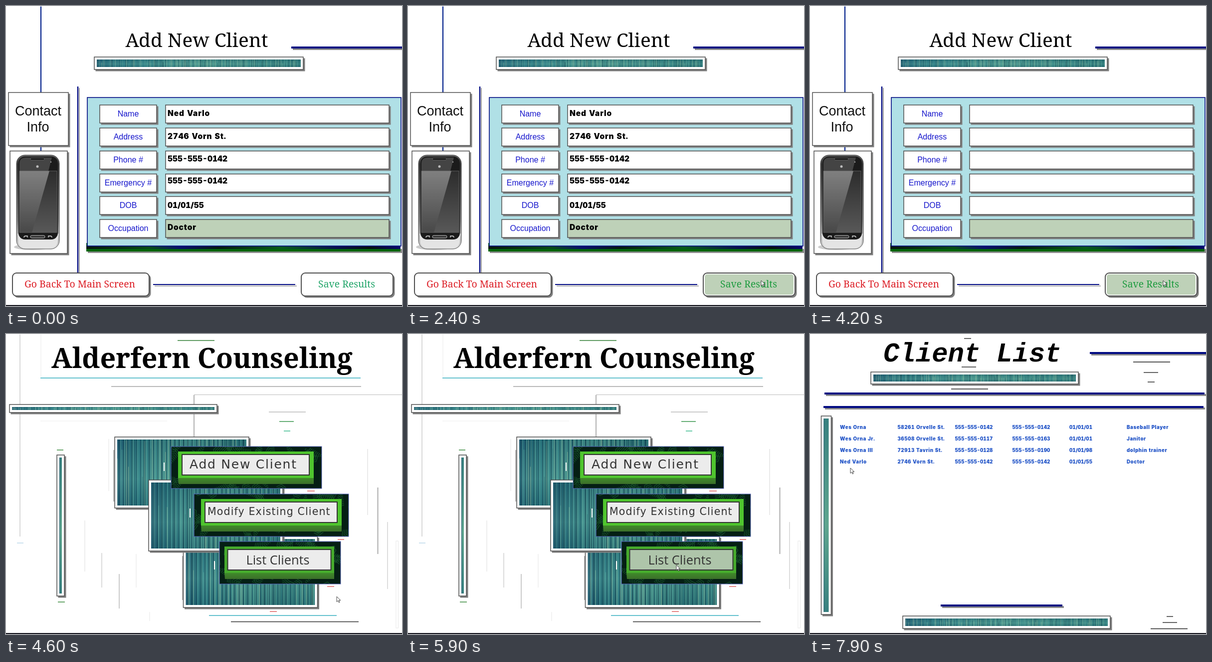
Write an HTML page that moves like this. It is 794 px wide and 600 px high and loops after 8 s.

```html
<!DOCTYPE html>
<html lang="en">
<head>
<meta charset="utf-8">
<title>Client manager</title>
<style>
  html, body { margin: 0; width: 100%; height: 100%; overflow: hidden; background: #fff; }
  svg { display: block; }
  .serif { font-family: "Noto Serif", "Liberation Serif", serif; }
  .sans { font-family: "Liberation Sans", Arial, sans-serif; }
  .human { font-family: "Open Sans", "Noto Sans", sans-serif; }
  .wide { font-family: "DejaVu Sans", Verdana, sans-serif; }
  .heavy { font-family: Inter, Roboto, sans-serif; font-weight: 900; font-variant-numeric: tabular-nums; }
  .mono { font-family: "Liberation Mono", monospace; font-weight: 700; font-style: italic; }
  .bold { font-weight: 700; }
  .mid { text-anchor: middle; }
  text { white-space: pre; }
</style>
</head>
<body>
<svg id="stage" width="794" height="600" viewBox="0 0 794 600">
  <defs>
    <linearGradient id="teal">
      <stop offset="0" stop-color="#235f78"/><stop offset=".12" stop-color="#2b7a86"/>
      <stop offset=".5" stop-color="#48978f"/><stop offset="1" stop-color="#2c7a7c"/>
    </linearGradient>
    <linearGradient id="tealDown" x2="0" y2="1">
      <stop offset="0" stop-color="#37807f"/><stop offset=".55" stop-color="#5fa68f"/>
      <stop offset="1" stop-color="#37807f"/>
    </linearGradient>
    <linearGradient id="shade" x2="0" y2="1">
      <stop offset="0" stop-color="#0c3a4a" stop-opacity=".22"/>
      <stop offset=".6" stop-color="#7cc0a8" stop-opacity=".18"/>
      <stop offset="1" stop-color="#0c3a4a" stop-opacity=".18"/>
    </linearGradient>
    <linearGradient id="band">
      <stop offset="0" stop-color="#06160c"/><stop offset=".2" stop-color="#0a4a18"/>
      <stop offset=".3" stop-color="#08106a"/><stop offset=".42" stop-color="#041a10"/>
      <stop offset=".62" stop-color="#0a5a1c"/><stop offset=".8" stop-color="#06104c"/>
      <stop offset=".9" stop-color="#04120c"/><stop offset="1" stop-color="#08086e"/>
    </linearGradient>
    <linearGradient id="rim" x2="0" y2="1">
      <stop offset="0" stop-color="#666"/><stop offset=".1" stop-color="#333"/>
      <stop offset=".7" stop-color="#777"/><stop offset="1" stop-color="#d8d8d8"/>
    </linearGradient>
    <linearGradient id="glass" x2="0" y2="1">
      <stop offset="0" stop-color="#2c2c2c"/><stop offset="1" stop-color="#585858"/>
    </linearGradient>
    <linearGradient id="glare" x2="0" y2="1">
      <stop offset="0" stop-color="#808080"/><stop offset="1" stop-color="#484848"/>
    </linearGradient>
    <linearGradient id="bevel" x2="0" y2="1">
      <stop offset="0" stop-color="#3f8a2a"/><stop offset="1" stop-color="#3c6f2a"/>
    </linearGradient>
  </defs>
  <g id="form"></g>
  <g id="menu"></g>
  <g id="list"></g>
  <rect y="598" width="794" height="2" fill="#14141c"/>
  <path id="cursor" d="M0 0V10.5L2.6 8.2 4.4 12 6 11.2 4.3 7.6H7.8Z" fill="#fff" stroke="#333" stroke-width=".9"/>
</svg>
<script>
const NAVY = '#000a82', HOVER = '#bed1b8';
const $ = id => document.getElementById(id);

let seed = 7;
const rnd = () => (seed = seed * 16807 % 2147483647) / 2147483647;

const rect = (x, y, w, h, fill, more = '') =>
  `<rect x="${x}" y="${y}" width="${w}" height="${h}" fill="${fill}" ${more}/>`;
const line = (x1, y1, x2, y2, color, w = 1.5) =>
  `<path d="M${x1} ${y1}L${x2} ${y2}" stroke="${color}" stroke-width="${w}"/>`;
const hline = (x1, x2, y, color, w) => line(x1, y, x2, y, color, w);
const vline = (x, y1, y2, color, w) => line(x, y1, x, y2, color, w);
const text = (str, x, y, size, cls, fill, gap = 0) =>
  `<text x="${x}" y="${y}" font-size="${size}" class="${cls}" fill="${fill}" letter-spacing="${gap}">${str}</text>`;
const heavy = (str, x, y, size, fill) =>
  text(str, x, y, size, 'heavy', fill, /[a-z]/i.test(str) ? size * .055 : 0);
const bar = (x1, x2, y) =>
  rect(x1 + 3, y + 3, x2 - x1, 4, '#8a8a8a') + rect(x1, y, x2 - x1, 4, NAVY);
const box = (x, y, w, h, fill = '#fff', r = 0, edge = 1.5) =>
  rect(x + 3, y + 3, w, h, '#7f7f7f', `rx="${r}" stroke="#7f7f7f"`) +
  rect(x, y, w, h, fill, `rx="${r}" stroke="#505050" stroke-width="${edge}"`);
const clip = (x, y, w, h, inner) =>
  `<svg x="${x}" y="${y}" width="${w}" height="${h}">${inner}</svg>`;

// Painted planks: random thin stripes over a teal blend
function wood(x, y, w, h, pitch) {
  const tones = ['#123f4c', '#1c5a66', '#5fae9f', '#a6cba4', '#2a8089'];
  const paths = tones.map(() => '');
  for (let p = 0; p < w; p += pitch * (.4 + rnd())) {
    const k = Math.floor(rnd() * tones.length);
    const top = rnd() < .3 ? rnd() * h * .6 : 0;
    paths[k] += `M${p.toFixed(1)} ${top.toFixed(1)}V${h}`;
  }
  let s = rect(0, 0, w, h, 'url(#teal)');
  tones.forEach((c, i) => {
    s += `<path d="${paths[i]}" stroke="${c}" stroke-width="${pitch * .45}" opacity=".6"/>`;
  });
  if (h > 50) {
    let gaps = '', ridges = '';
    for (let p = 4; p < w; p += 8.6) {
      gaps += `M${p} 0V${h}`;
      ridges += `M${p + 3} 0V${h}`;
    }
    s += `<path d="${ridges}" stroke="#62ad9f" stroke-width="2" opacity=".4"/>` +
      `<path d="${gaps}" stroke="#103f50" stroke-width="1.5" opacity=".8"/>`;
  }
  return clip(x, y, w, h, s + rect(0, 0, w, h, 'url(#shade)'));
}
const framed = (x, y, w, h, pitch = 2) =>
  box(x, y, w, h) + wood(x + 5, y + 5, w - 10, h - 10, pitch);
const upright = (x, y, w, h) =>
  box(x, y, w, h) + rect(x + 5, y + 5, w - 10, h - 10, 'url(#tealDown)') +
  vline(x + 5.5, y + 5, y + h - 5, '#235f70', 1);

function ferns(x, y, w, h) {
  let d = '';
  for (let i = 0; i < w / 7; i++) {
    const a = rnd() * 6.3, c = Math.cos(a), s = Math.sin(a);
    const fx = rnd() * w, fy = rnd() * h;
    for (let t = 0; t < 36; t += 4) {
      const px = fx + c * t, py = fy + s * t, len = (40 - t) * .28;
      for (const q of [a + 1, a - 1])
        d += `M${px.toFixed(1)} ${py.toFixed(1)}l${(Math.cos(q) * len).toFixed(1)} ${(Math.sin(q) * len).toFixed(1)}`;
    }
  }
  return clip(x, y, w, h, rect(0, 0, w, h, '#051f14') +
    `<path d="${d}" stroke="#1c6030" stroke-width="1.3" opacity=".75"/>`);
}

function plate(x, y, w, h, px, pw, ix, iw, label, id, green = '#4fc52e') {
  return ferns(x, y, w, h) +
    rect(x, y, w, h, 'none', 'stroke="#5866c4"') +
    rect(px, y + 10, pw, 54, green) +
    `<path d="M${px} ${y + 63}h${pw}v12H${px + 1}Z" fill="url(#bevel)"/>` +
    rect(ix, y + 16, iw, 41, '#ececec', `id="${id}" stroke="#333" stroke-width="2"`) + label;
}

function phone() {
  return box(8, 290, 115, 205) +
    `<ellipse cx="52" cy="482" rx="36" ry="6" fill="#aaa" opacity=".6"/>` +
    rect(21, 298, 86, 188, 'url(#rim)', 'rx="17" stroke="#555"') +
    `<path d="M23 455Q64 474 106 455L103 474Q100 485 86 485H42Q28 485 25 474Z" fill="#e4e4e4"/>` +
    rect(25, 301, 79, 166, '#1b1b1b', 'rx="13"') +
    `<path d="M27 330V315Q27 303 40 303H92L85 330Z" fill="#444"/>` +
    rect(49, 304, 28, 4, '#151515', 'rx="2" stroke="#777" stroke-width=".7"') +
    `<circle cx="63" cy="321" r="2.5" fill="#bbb"/><circle cx="90" cy="312" r="1.3" fill="#999"/>` +
    rect(27, 330, 75, 123, 'url(#glass)') +
    `<path d="M27 330H87L52 453H27Z" fill="url(#glare)"/>` +
    rect(27, 330, 75, 123, 'none', 'stroke="#777" stroke-width=".7"') +
    rect(49, 459, 29, 5, '#333', 'rx="2.5" stroke="#ccc"') +
    `<path d="M36 463q0-3 3-3h4v3M92 463q0-3-3-3h-4v3" fill="none" stroke="#ddd" stroke-width="1.3"/>`;
}

function buildForm() {
  const rows = [['Name', 'Ned Varlo', 220], ['Address', '2746 Vorn St.', 266],
    ['Phone #', '555-555-0142', 311], ['Emergency #', '555-555-0142', 355],
    ['DOB', '01/01/55', 404], ['Occupation', 'Doctor', 448]];
  let s = vline(70, 1, 290, '#04238c', 2.2) +
    text('Add New Client', 382.5, 82, 38.8, 'serif mid', '#000') +
    bar(572, 794, 81) + framed(177, 102, 419, 25) +
    box(5, 173, 120, 106) +
    text('Contact', 64.5, 219, 27, 'sans mid', '#111') + text('Info', 64, 251, 27, 'sans mid', '#111') +
    phone() +
    vline(147, 164, 533, '#8a8a8a', 1.6) + vline(144, 161, 533, NAVY, 2.4) +
    rect(164, 486, 630, 8, '#8c8c8c') + rect(161, 474, 630, 17, '#00640a') +
    rect(161, 479, 630, 7, 'url(#band)') +
    rect(163, 183, 629, 297, '#b0e0e6', `stroke="${NAVY}" stroke-width="1.6"`);
  let values = '';
  rows.forEach(([label, value, base], i) => {
    const y = Math.round(198.4 + i * 45.7);
    s += box(188, y, 114, 36) + text(label, 245, y + 23, 16, 'sans mid', '#1616cc') +
      box(320, y, 448, 36, i == 5 ? HOVER : '#fff');
    values += heavy(value, 324, base, 15.5, '#000');
  });
  return s + `<g id="values">${values}</g>` +
    box(13, 534, 274, 46, '#fff', 8, 2) +
    text('Go Back To Main Screen', 148, 563, 19.4, 'serif mid', '#dc1c24') +
    hline(298, 583, 560, '#999', 1.4) + hline(295, 580, 557, NAVY, 2) +
    box(592, 534, 184, 46, '#fff', 8, 2) +
    rect(595, 536.5, 178, 41, HOVER, 'id="saveFill" rx="5"') +
    `<g id="save">${text('Save Results', 683, 563, 19.4, 'serif mid', 'inherit')}</g>`;
}

function buildMenu() {
  const across = [[344, 418, 13, '#2f7d32'], [69, 711, 88, '#35aebf', 1.5], [211, 712, 105, '#777', 1.2],
    [377, 794, 121.5, '#bbb', 1], [69, 323, 174, '#ededed', 1], [527, 601, 156, '#bbb'],
    [548, 577, 175, '#36944a'], [557, 570, 194, '#3fbd90'], [102, 115, 232, '#3c8c40'],
    [104, 118, 536, '#3c8c40'], [604, 619, 314, '#e06060'], [665, 678, 411, '#e06060'],
    [644, 658, 505, '#e06060'], [529, 543, 555, '#e06060'], [407, 663, 563, '#35aebf', 1.5],
    [451, 707, 575.5, '#333'], [22, 35, 418, '#bcd8ea']];
  const down = [[28, 1, 405, '#ccc'], [70, 1, 86, '#f2f2f2'], [377, 122, 206, '#999'],
    [158, 373, 475, '#e8e8e8'], [192, 438, 507, '#d0d0d0'], [227, 480, 549, '#b8b8b8'],
    [261, 440, 507, '#ececec'], [206, 210, 314, '#eee'], [288, 556, 574, '#eee'],
    [216, 232, 335, '#999'], [354, 444, 532, '#999'], [725, 230, 362, '#e4e4e4'],
    [745.5, 307, 440, '#bbb', 2.5], [765, 376, 510, '#ddd', 2]];
  const planks = (x, y) => framed(x, y, 269, 142, 3);
  let s = '';
  for (const l of across) s += hline(...l);
  for (const l of down) s += vline(...l);
  return s + rect(782, 414, 4.5, 174, 'none', 'stroke="#e8e8e8"') +
    text('Alderfern Counseling', 393, 68, 55.5, 'serif bold mid', '#000') +
    framed(7, 141, 416, 16) + upright(102, 242, 15, 282) +
    planks(218, 206) + planks(355.5, 405) + planks(286, 292) +
    vline(317, 257, 274, '#fff', 2) + vline(369, 349, 367, '#fff', 2) + vline(418, 454, 471, '#fff', 2) +
    plate(331, 225, 302, 84, 345, 272, 353, 255, text('Add New Client', 368, 269, 25, 'wide', '#333', 1.75), 'b1') +
    plate(377, 320, 310, 85, 391, 282, 399, 265, text('Modify Existing Client', 404, 362, 20.5, 'wide', '#333', 1.15), 'b2') +
    plate(428, 415, 243, 85, 438, 220, 444.5, 207, text('List Clients', 481.5, 461, 25.4, 'human', '#333'), 'b3', '#46ab2c');
}

function buildList() {
  const cols = [60, 175.5, 290.5, 405.5, 520, 635];
  const rows = [
    ['Wes Orna', '58261 Orvelle St.', '555-555-0142', '555-555-0142', '01/01/01', 'Baseball Player'],
    ['Wes Orna Jr.', '36508 Orvelle St.', '555-555-0117', '555-555-0163', '01/01/01', 'Janitor'],
    ['Wes Orna III', '72913 Tavrin St.', '555-555-0128', '555-555-0190', '01/01/98', 'dolphin trainer'],
    ['Ned Varlo', '2746 Vorn St.', '555-555-0142', '555-555-0142', '01/01/55', 'Doctor']];
  const dashes = [[309, 323, 9], [304, 333, 66], [283, 357, 110], [648, 722, 56], [669, 698, 77],
    [677, 691, 96], [715, 728, 565], [707, 736, 577], [683, 757, 589.5]];
  let s = text('Client List', 147, 55, 54, 'mono', '#000');
  for (const d of dashes) s += hline(...d, '#222', 1.4);
  s += bar(561, 794, 36) + framed(122, 76, 416, 24) + bar(29, 791, 117) + bar(27, 789, 144) +
    upright(22.5, 164, 20, 397) + bar(262, 506, 541) + framed(186, 564, 416, 25);
  rows.forEach((row, r) => row.forEach((cell, c) => {
    s += heavy(cell, cols[c], 190 + r * 23, 9.8, '#2456c8');
  }));
  return s;
}

$('form').innerHTML = buildForm();
$('menu').innerHTML = buildMenu();
$('list').innerHTML = buildList();

const LOOP = 8000, CLEAR = 3800, MENU = 4300, LIST = 6400;
// time, x, y of the pointer tip
const path = [[0, 800, 430], [800, 800, 430], [1400, 734, 485], [1700, 734, 485], [2400, 708, 549],
  [4400, 708, 549], [5000, 535, 457], [5300, 535, 457], [5800, 538, 462], [6800, 538, 462],
  [7600, 81, 268], [LOOP, 81, 268]];

function tip(t) {
  const i = path.findIndex(p => p[0] > t);
  const [t0, x0, y0] = path[i - 1], [t1, x1, y1] = path[i];
  const u = (t - t0) / (t1 - t0), e = u * u * (3 - 2 * u);
  return [x0 + (x1 - x0) * e, y0 + (y1 - y0) * e];
}
const inside = (x, y, l, t, r, b) => x > l && x < r && y > t && y < b;
const show = (id, on) => { $(id).style.display = on ? '' : 'none'; };

function draw(ms) {
  // ten steps a second, every eighth of which is skipped
  let n = Math.floor(ms % LOOP / 100);
  if (n % 8 == 4) n--;
  const t = n * 100, [x, y] = tip(t);
  show('form', t < MENU);
  show('menu', t >= MENU && t < LIST);
  show('list', t >= LIST);
  show('values', t < CLEAR);
  const over = inside(x, y, 592, 534, 776, 580);
  show('saveFill', over);
  $('save').setAttribute('fill', over ? '#1f9c40' : '#22a56a');
  $('b3').setAttribute('fill', inside(x, y, 444, 431, 652, 473) ? '#aec5aa' : '#ececec');
  $('cursor').setAttribute('transform', `translate(${x.toFixed(1)} ${y.toFixed(1)})`);
}

const start = performance.now();
(function tick() {
  draw(performance.now() - start);
  requestAnimationFrame(tick);
})();
</script>
</body>
</html>
```
